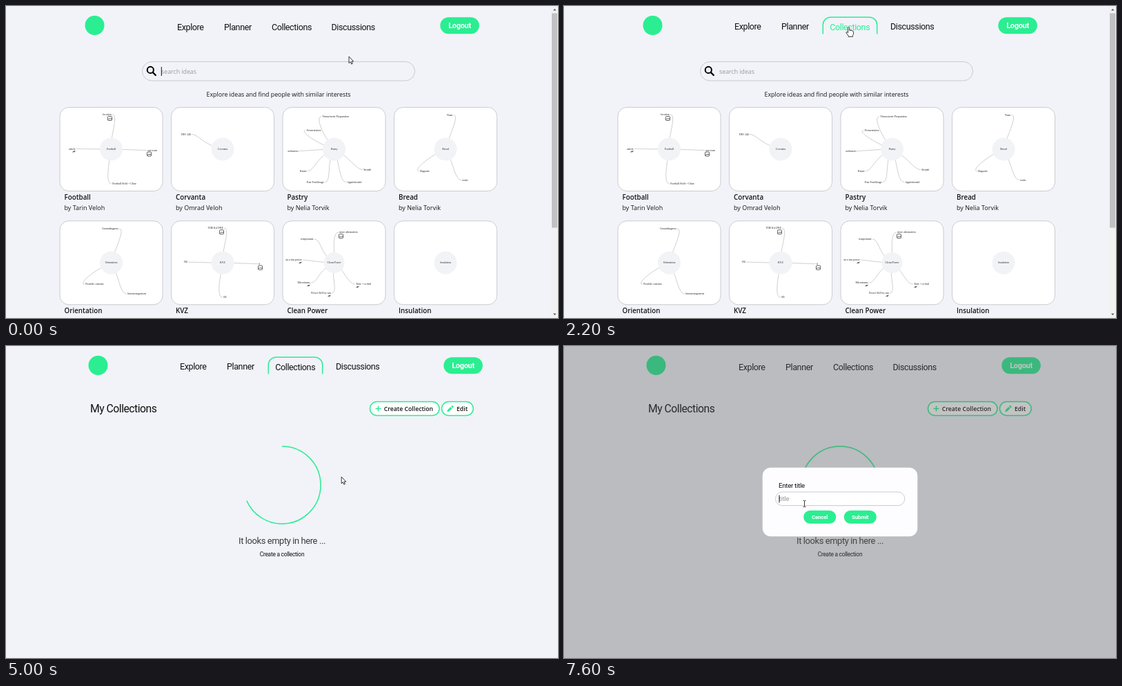
Animation, 800 px wide and 451 px high, one loop 8 s. Source, as an HTML page:

```html
<!DOCTYPE html>
<html lang="en">
<head>
<meta charset="utf-8">
<title>Collections</title>
<style>
  html, body { margin: 0; width: 100%; height: 100%; overflow: hidden; background: #f1f3f9; }
  svg { display: block; width: 800px; height: 451px; background: #f1f3f9; }
  text { font-family: "Open Sans", "Noto Sans", sans-serif; font-size: 8.8px; fill: #151515; }
  .narrow { font-family: Roboto, sans-serif; letter-spacing: -.03em; fill: #111; }
  .nav { font-size: 12.5px; }
  .bold { font-weight: 600; }
  .white { font-weight: 700; fill: #fff; }
  .mid { text-anchor: middle; }
  .hint { fill: #999; }
  .soft { fill: #3a3a3a; }
  .tiny { font: 3.9px "Liberation Serif", "Noto Serif", serif; fill: #222; }
  .green { fill: #2aee91; }
  .line { fill: none; stroke: #2aee91; stroke-width: 1.5; }
  .branch { fill: none; stroke: #bbb; stroke-width: .7; }
  .box { fill: #fff; stroke: #cbccd0; }
  .icon { fill: #fff; stroke: #222; stroke-width: .7; }
  .caret { stroke: #111; }
  .cursor { fill: #fff; stroke: #222; stroke-width: .9; stroke-linejoin: round; }
</style>
</head>
<body>
<svg id="stage" viewBox="0 0 800 451" xmlns="http://www.w3.org/2000/svg"></svg>
<script>
const GREEN = '#2aee91', LOOP = 8000, STEP = 200;

const text = (x, y, s, cls = '', size) =>
  `<text x="${x}" y="${y}" class="${cls}"${size ? ` style="font-size:${size}px"` : ''}>${s}</text>`;
const box = (x, y, w, h, r, attrs) =>
  `<rect x="${x}" y="${y}" width="${w}" height="${h}" rx="${r}" ${attrs}/>`;
const path = (d, attrs) => `<path d="${d}" ${attrs}/>`;
const pill = (x, y, w, h) => box(x, y, w, h, h / 2, 'class="green"');

// Branch: label, end of the line relative to the hub, side of the label, icon
const cards = [
  ['Football', 'Tarin Veloh', [
    ['location', 1.5, -50, -1, 'image'], ['article', -50.5, -.5, -1, 'link'],
    ['our team', 51.5, 1.5, 1, 'image'], ['Football Field + Chair', .5, 50, 1]]],
  ['Corvanta', 'Omrad Veloh', [['TRV 240', -45, -21.5, -1]]],
  ['Pastry', 'Nelia Torvik', [
    ['Viennoiserie Preparation', -18.5, -47, 1], ['Fermentation', -41, -27, 1],
    ['ordinaries', -50.5, 2.5, -1], ['Butter', -38.5, 31.5, -1],
    ['Pate Feuilletage', -13.5, 47.5, -1], ['Appfelstrudel', 17.5, 47.5, 1],
    ['Strudel', 41.5, 29.5, 1]]],
  ['Bread', 'Nelia Torvik', [
    ['Naan', 11.5, -49.5, -1], ['Baguette', -38, 31.5, 1], ['rustic', 23, 44.5, 1]]],
  ['Orientation', '', [
    ['Groundingness', 11.5, -49, -1], ['Possible currents', -38.5, 31, 1],
    ['Interarrangement', 22.5, 45, 1]]],
  ['KVZ', '', [
    ['THE K4 ONE', 2, -50, -1, 'image'], ['H4', -50, -1, -1],
    ['ii', 51, 1.5, 1, 'image'], ['H5', 0, 50, 1]]],
  ['Clean Power', '', [
    ['more alternatives', 6.5, -44, 1, 'image'], ['temperature', -28.5, -34, -1],
    ['on a fast power', -45.5, -4, -1, 'link'], ['Microfarms', -33.5, 29, -1, 'link'],
    ['Power Still by sun', -3.5, 44, -1, 'link'], ['Task + to find', 30.5, 31, 1, 'link']]],
  ['Insulation', '', []],
];

const icons = {
  image: (x, y) => box(x - 3, y + 2.5, 6, 6, 1, 'class="icon"') +
    path(`M${x - 2.5} ${y + 7.5}l2-2 1 1 1-1 1.2 1.5`, 'class="icon"'),
  link: (x, y) => path(`M${x - 2} ${y + 5}l1.6-1.8 1.6 .6M${x + 2} ${y + 2.5}l-1.4 2-1.8-.2`, 'class="icon"'),
};

function branch(cx, cy, [label, dx, dy, side, icon]) {
  const x = cx + dx, y = cy + dy;
  const bend = `${cx - 3 + dx * .6} ${cy + dy * .35} ${x - side * 10} ${y}`;
  return path(`M${cx} ${cy}C${bend} ${x} ${y}`, 'class="branch"') +
    `<text class="tiny" x="${x + side * 1.2}" y="${y + 1}" text-anchor="${side > 0 ? 'start' : 'end'}">${label}</text>` +
    (icon ? icons[icon](x + side * 3.5, y) : '');
}

function card([title, author, branches], i) {
  const x = 78 + (i % 4) * 161.5, y = 146.5 + (i >> 2) * 164.2;
  const cx = x + 74.5, cy = y + 60.5;
  return box(x, y, 149, 121, 13, 'class="box"') +
    branches.map(b => branch(cx, cy, b)).join('') +
    `<circle cx="${cx}" cy="${cy}" r="${title === 'Clean Power' ? 15 : 16.5}" fill="#f2f3f6"/>` +
    text(cx, cy + 1, title, 'tiny mid') +
    text(x + 6.5, y + 133.3, title, 'bold', 9.8) +
    (author && text(x + 6.5, y + 148.3, 'by ' + author, '', 9));
}

const navItems = [['Explore', 248], ['Planner', 316], ['Collections', 385], ['Discussions', 471.5]];
const tabShift = [[-1, -.6], [-1, -.6], [.2, .4], [1.5, -.6]];

const header = `<g id="header">
  <circle cx="128.5" cy="28" r="14" fill="${GREEN}"/>
  ${path('M375.3 40.5V27.5a11 11 0 0 1 11-11.2h56.4a11 11 0 0 1 11 11.2V40.5', 'id="tab" class="line"')}
  ${navItems.map(([s, x]) => text(x, 34.7, s, 'narrow nav item')).join('')}
  ${pill(629.3, 16.2, 56.5, 24)}${text(657.5, 32, 'Logout', 'narrow white mid', 11)}
</g>`;

const home = `<g id="home">
  ${box(197.5, 80.5, 395, 27.5, 13.7, 'fill="none" stroke="#c9cacf"')}
  <circle cx="209.3" cy="92.4" r="4.6" fill="none" stroke="#000" stroke-width="2"/>
  ${path('M212.8 96l4 4', 'stroke="#000" stroke-width="2.4" stroke-linecap="round"')}
  ${text(225, 97.5, 'search ideas', 'hint')}
  ${path('M225.3 88v13', 'id="searchCaret" class="caret"')}
  ${text(395, 130.5, 'Explore ideas and find people with similar interests', 'mid')}
  ${cards.map(card).join('')}
  ${box(790.5, 0, 9.5, 451, 0, 'fill="#f1f1f1"')}${box(791, 10.5, 8, 310, 0, 'fill="#c1c1c1"')}
  ${path('M793 6.5l2.2-2.6 2.2 2.6zM793 444.5l2.2 2.6 2.2-2.6z', 'fill="#555"')}
</g>`;

const collections = `<g id="collections">
  ${text(122, 96, 'My Collections', 'narrow', 15.7)}
  ${box(527.5, 80.5, 100.5, 20, 10, 'class="line" style="fill:#fff"')}
  ${path('M535.5 90.5h8M539.5 86.5v8', 'class="line"')}
  ${text(547.7, 94, 'Create Collection', 'bold', 8.7)}
  ${box(631.5, 80.5, 45.7, 20, 10, 'class="line" style="fill:#fff"')}
  ${path('M639.3 95.3l.7-3 4.3-4.3 2.3 2.3-4.3 4.3zM645 87.3l1-1q.8-.6 1.6.1l.7.7q.7.8.1 1.6l-1 1z', 'class="green"')}
  ${text(653, 94, 'Edit', 'bold', 8.7)}
  <circle id="outline" cx="400" cy="201" r="56" class="line"
    pathLength="1" stroke-dasharray="1" transform="rotate(-90 400 201)"/>
  ${text(400, 286, 'It looks empty in here ...', 'narrow soft mid', 12.9)}
  ${text(400, 304, 'Create a collection', 'narrow mid', 8.4)}
</g>`;

const modal = `<g id="modal">
  ${box(0, 0, 800, 451, 0, 'fill="#5a5a5a" fill-opacity=".36"')}
  ${box(287.7, 175.7, 224.6, 99.6, 12, 'fill="#fdfcfe"')}
  ${text(311, 204.5, 'Enter title', 'narrow', 9.7)}
  ${box(306.5, 211, 187.3, 19.6, 9.8, 'class="box"')}
  ${text(311.5, 224, 'title', 'narrow hint', 9.7)}
  ${path('M312 215.5v11', 'id="titleCaret" class="caret"')}
  ${pill(347.2, 237.8, 47, 19)}${text(370.6, 250.2, 'Cancel', 'narrow white mid', 8)}
  ${pill(405.8, 237.8, 47, 19)}${text(429.2, 250.2, 'Submit', 'narrow white mid', 8)}
</g>`;

const shapes = {
  arrow: 'M0 0V9.6L2.2 7.6 3.7 11 5.2 10.3 3.8 7H6.6Z',
  hand: 'M-1.1 1Q0-.8 1.1 1V5Q2.2 4.2 3.2 5.3 4.4 4.6 5.2 5.8 6.6 5.4 6.8 7V10Q6.6 11.5 5.7 12.4V14H-.6V12.6L-3.7 8.6Q-4 7-2.5 7.2L-1.1 8.4Z',
  beam: 'M-2-4.5H-.6L0-4 .6-4.5H2M0-4V4M-2 4.5H-.6L0 4 .6 4.5H2',
};

// time, x, y, shape from this time on
const moves = [
  [0, 497, 73, 'arrow'], [200, 497, 73, 'arrow'], [1200, 440.5, 72, 'arrow'],
  [1800, 424, 52, 'arrow'], [2000, 424, 52, 'arrow'], [2200, 412.7, 30.3, 'hand'],
  [3000, 415, 44, 'arrow'], [4000, 443, 244.5, 'arrow'], [4600, 443, 244.5, 'arrow'],
  [5600, 565.7, 87.3, 'hand'], [6200, 565.7, 87.3, 'hand'], [6400, 562.7, 88, 'arrow'],
  [6600, 562.7, 88, 'arrow'], [7200, 348.5, 228, 'beam'], [LOOP, 348.5, 228, 'beam'],
];

const stage = document.getElementById('stage');
stage.innerHTML = header + home + collections + modal + '<path id="cursor" class="cursor"/>';
const el = id => document.getElementById(id);
const items = [...document.querySelectorAll('.item')];
const show = (id, on) => el(id).setAttribute('display', on ? 'inline' : 'none');
const ease = p => p * p * (3 - 2 * p);

function drawCursor(t) {
  const i = moves.findIndex((m, k) => k + 1 < moves.length && t < moves[k + 1][0]);
  const [t0, x0, y0, shape] = moves[i], [t1, x1, y1] = moves[i + 1];
  const p = ease((t - t0) / (t1 - t0));
  el('cursor').setAttribute('d', shapes[shape]);
  el('cursor').setAttribute('transform', `translate(${x0 + (x1 - x0) * p} ${y0 + (y1 - y0) * p})`);
}

function draw(t) {
  const onHome = t < 2600, open = t >= 6400;
  const tab = t >= 2200 && !open, hover = t >= 2200 && t < 3000;
  show('home', onHome);
  show('collections', !onHome);
  show('modal', open);
  show('tab', tab);
  el('header').setAttribute('transform', `translate(${onHome ? 0 : 5} 0)`);
  items.forEach((item, i) =>
    item.setAttribute('transform', `translate(${tab ? tabShift[i] : '0 0'})`));
  items[2].style.fill = hover ? GREEN : '';
  show('searchCaret', t < 2200 && t % 1060 < 530);
  show('titleCaret', t >= 7400);
  const drawn = Math.min(1, Math.max(0, (t - 4000) / 1600));
  show('outline', drawn > 0);
  el('outline').setAttribute('stroke-dashoffset', 1 - ease(drawn));
  drawCursor(t);
}

const start = performance.now();
function tick() {
  const t = (performance.now() - start) % LOOP;
  draw(Math.floor(t / STEP) * STEP);
  requestAnimationFrame(tick);
}
tick();
</script>
</body>
</html>
```
